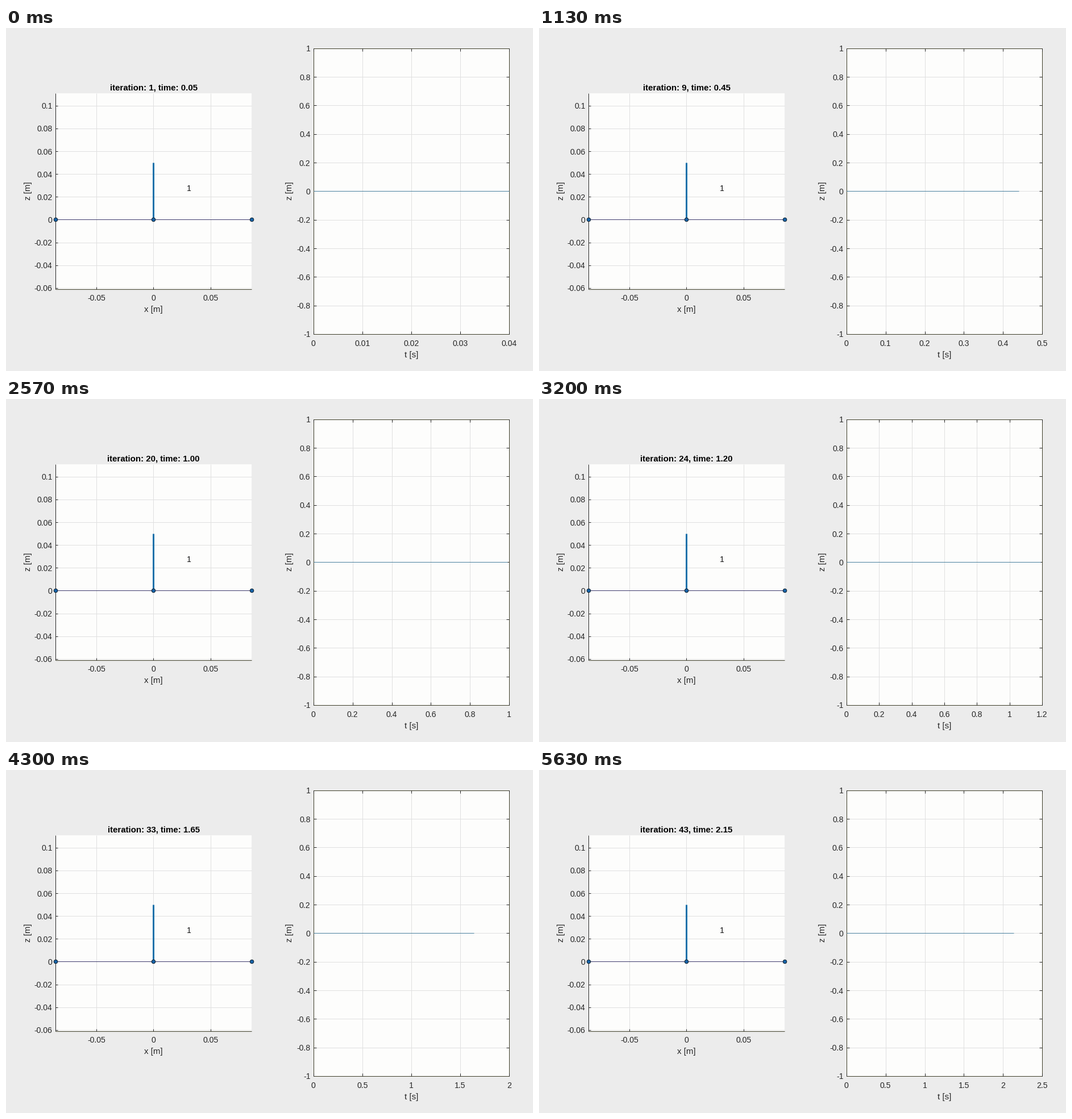
Recreate the animation shown at these times as a matplotlib script. Size 927 by 604 pixels, loop 5.66 s.

```python
import matplotlib.pyplot as plt
from matplotlib.animation import FuncAnimation
from matplotlib.collections import LineCollection
from matplotlib.patches import Rectangle

W, H, DPI = 927, 604, 64
PT = 72 / DPI                     # points per pixel
FRAMES, LOOP = 170, 5660
INK, FRAME, GRID, PAPER = "#262626", "#3e3e2a", "#e0e0e0", "#fdfdfc"

plt.rcParams["font.family"] = "Liberation Sans"
fig = plt.figure(figsize=(W / DPI, H / DPI), dpi=DPI, facecolor="#ececec")
ax = fig.add_axes([0, 0, 1, 1])
ax.set_xlim(0, W)
ax.set_ylim(H, 0)
ax.axis("off")


# Whole-number coordinates name the pixel a thin line fills.
def line(x0, y0, x1, y1, color=INK, width=1, z=3):
    return ax.plot([x0, x1], [y0, y1], color=color, lw=width * PT, zorder=z,
                   solid_capstyle="butt", snap=True)[0]


def segments(color, z):
    return ax.add_collection(LineCollection([], colors=color, linewidths=PT, zorder=z),
                             autolim=False)


def text(x, y, s, size=14, ha="center", color=INK, **kw):
    return ax.text(x, y, s, fontsize=size * PT, ha=ha, va="baseline",
                   color=color, zorder=6, **kw)


def upright(x, y, s):
    text(x, y, s, 15, rotation=90, rotation_mode="anchor")


def panel(x0, y0, x1, y1):
    ax.add_patch(Rectangle((x0, y0), x1 - x0, y1 - y0, fc=PAPER, ec="none", zorder=0))


# Left panel: the bar standing on its base line
LX0, LY0, LX1, LY1 = 87, 115, 432, 460
OX, OY, SCALE = 259.4, 337.4, 2005
panel(LX0, LY0, LX1, LY1)
for k in (-1, 0, 1):
    x = OX + 0.05 * k * SCALE
    line(x, LY0, x, LY1, GRID, z=1)
    line(x, LY1, x, LY1 - 4)
    text(x, 480, f"{0.05 * k:g}")
for k in range(-3, 6):
    y = OY - 0.02 * k * SCALE
    line(LX0, y, LX1, y, GRID, z=1)
    line(LX0, y, LX0 + 4, y)
    text(81.4, y + 5.5, f"{0.02 * k:g}", ha="right")
line(LX0, LY0, LX0, LY1)
line(LX0, LY1, LX1, LY1, FRAME)
line(LX0, OY, LX1, OY, "#3f3c6e", z=4)
line(OX, OY, OX, OY - 0.05 * SCALE, "#1572ab", 3, 4)
ax.plot([LX0 + 0.5, OX, LX1], [OY] * 3, "o", ms=6.5 * PT, mfc="#1763a8",
        mec="#10202c", mew=PT, zorder=5)
text(321.4, 287, "1", color="#111111")
text(259.6, 500, "x [m]", 15)
upright(43, 287, "z [m]")
title = text(259.6, 109, "", 15, color="black", weight="bold")

# Right panel: the flat signal over a growing time axis
RX0, RY0, RX1, RY1 = 541, 36, 885, 539
MID = 287.4
panel(RX0, RY0, RX1, RY1)
for k in range(-5, 6):
    y = MID - k * (RY1 - RY0) / 10
    line(RX0, y, RX1, y, GRID, z=1)
    line(RX0, y, RX0 + 5, y)
    line(RX1, y, RX1 - 5, y)
    text(535.4, y + 5.5, f"{k / 5:g}", ha="right")
ax.add_patch(Rectangle((RX0, RY0), RX1 - RX0, RY1 - RY0, fill=False, ec=FRAME,
                       lw=PT, zorder=3))
text(712.8, 580, "t [s]", 15)
upright(503, 287, "z [m]")
grid, ticks = segments(GRID, 1), segments(INK, 3)
labels = [text(0, 560, "") for _ in range(8)]
signal = line(RX0, MID, RX0, MID, "#4a819f", z=4)


def tick_step(span):
    """Smallest 1-2-5 step that needs at most seven intervals."""
    return next(s for s in (1, 2, 5, 10, 20, 50, 100) if span <= 7 * s)


def update(i):
    n = 1 + int(0.31 + 0.2467 * i)
    title.set_text(f"iteration: {n}, time: {0.05 * n:.2f}")

    end = 5 * n - 1               # hundredths of a second
    step = tick_step(end)
    count = -(-end // step)
    xs = [RX0 + (RX1 - RX0) * k / count for k in range(count + 1)]
    grid.set_segments([[(x, RY0), (x, RY1)] for x in xs])
    ticks.set_segments([[(x, y), (x, y + d)] for x in xs
                        for y, d in ((RY0, 5), (RY1, -5))])
    for k, label in enumerate(labels):
        label.set_visible(k <= count)
        if k <= count:
            label.set_x(xs[k] - 0.2)
            label.set_text(f"{k * step / 100:g}")
    signal.set_xdata([RX0, RX0 + (RX1 - RX0) * end / (count * step)])
    return [title, grid, ticks, signal, *labels]


anim = FuncAnimation(fig, update, frames=FRAMES, interval=LOOP / FRAMES,
                     repeat=True, repeat_delay=0, blit=False)
plt.show()
```
